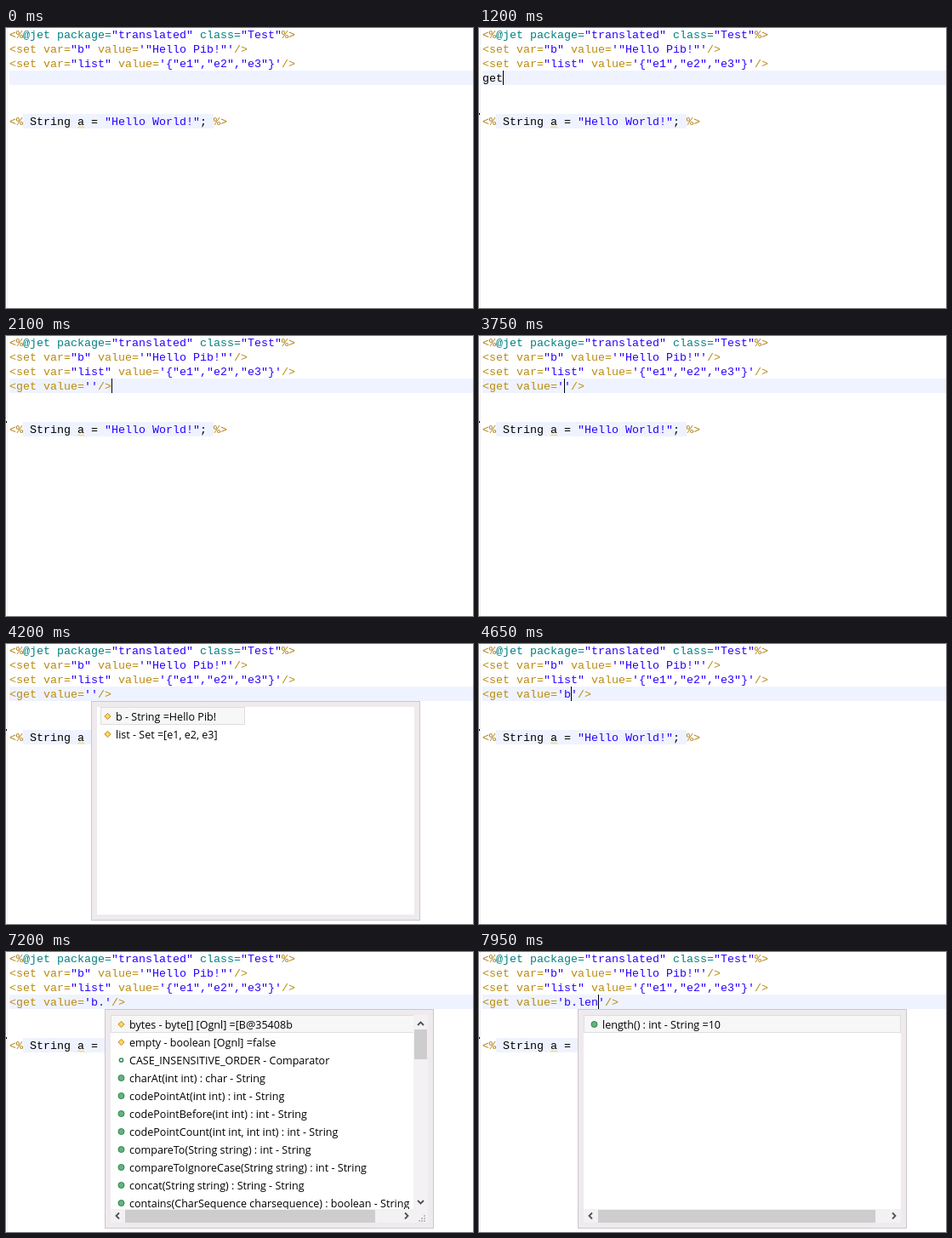
Recreate the animation shown at these times as an HTML page. Size 549x329 px, loop 8000 ms.

```html
<!DOCTYPE html>
<html lang="en">
<head>
<meta charset="utf-8">
<title>Template editor completion</title>
<style>
html, body { margin: 0; width: 100%; height: 100%; overflow: hidden; background: #fff; }
svg { display: block; }
text { white-space: pre; }
.code { font: 13.333px "Liberation Mono", "Courier New", monospace; }
.item { font: 12.55px "Open Sans", "Noto Sans", sans-serif; }
</style>
</head>
<body>
<svg id="stage" width="549" height="329" viewBox="0 0 549 329"></svg>
<script>
const LOOP = 8000;
const stage = document.getElementById('stage');
const C = { mark: '#b07d10', tag: '#bb8b10', attr: '#008080', str: '#2a00ff', plain: '#000', line: '#eff3ff', track: '#f3f1f3' };

const esc = s => s.replace(/&/g, '&amp;').replace(/</g, '&lt;').replace(/>/g, '&gt;');
const rect = (x, y, w, h, fill, extra = '') =>
  `<rect x="${x}" y="${y}" width="${w}" height="${h}" fill="${fill}" ${extra}/>`;
const path = (d, stroke, width = 1, fill = 'none') =>
  `<path d="${d}" stroke="${stroke}" stroke-width="${width}" fill="${fill}"/>`;
const outlined = (x, y, w, h, fill, stroke) =>
  rect(x + .5, y + .5, w - 1, h - 1, fill, `stroke="${stroke}"`);

// Each part is [colour, text]; columns are 8px wide.
function codeLine(row, parts) {
  let col = 0;
  return parts.map(([color, s]) => {
    const out = `<text class="code" x="${4 + 8 * col}" y="${12 + 17 * row}" fill="${C[color]}">${esc(s)}</text>`;
    col += s.length;
    return out;
  }).join('');
}

// Splits a tag into quoted values and the rest.
const tagParts = s => s.split(/('[^']*'|"[^"]*")/).filter(Boolean)
  .map(p => [/^['"]/.test(p) ? 'str' : 'tag', p]);

const fixedCode =
  rect(1, 0, 1, 329, '#f0f0f0') +
  rect(4, 50, 545, 17, C.line) + rect(20, 101, 224, 17, C.line) +
  codeLine(0, [['mark', '<%'], ['attr', '@jet package='], ['str', '"translated"'],
    ['attr', ' class='], ['str', '"Test"'], ['mark', '%>']]) +
  codeLine(1, tagParts(`<set var="b" value='"Hello Pib!"'/>`)) +
  codeLine(2, tagParts(`<set var="list" value='{"e1","e2","e3"}'/>`)) +
  codeLine(6, [['mark', '<%'], ['plain', ' String a = '], ['str', '"Hello World!"'],
    ['plain', '; '], ['mark', '%>']]) +
  path('M84 117.5l2 -2 2 2 2 -2 2 2', '#f0c840');

const chevrons = (x, y, s, width = 1.2) =>
  path(`M${x - 2} ${y - s}l${-s} ${s} ${s} ${s}M${x + 2} ${y - s}l${s} ${s} ${-s} ${s}`, '#2878b0', width);
const page = (x, y) =>
  path(`M${x - 5.5} ${y - 6.5}h8l3.5 3.5v9.5h-11.5z`, '#a88848', 1, '#fffdf0') + chevrons(x, y + .5, 3, 1.4);
const dot = (y, r, fill, stroke, width = 1) =>
  `<circle cx="12.5" cy="${y}" r="${r}" fill="${fill}" stroke="${stroke}" stroke-width="${width}"/>`;

const icons = {
  tag: y => chevrons(11.5, y, 4),
  page: y => page(12, y),
  imports: y => path(`M9.5 ${y - 3.5}h7l3 3v6h-10z`, '#a88848', 1, '#ffe9a0') + chevrons(14, y + 1.5, 2) +
    path(`M5 ${y - 5.5}h8M5 ${y - 2.5}h8M7.5 ${y - 8}v8M10.5 ${y - 8}v8`, '#8a3a90', 1.5),
  field: y => path(`M12.5 ${y - 3.6}l3.6 3.6 -3.6 3.6 -3.6 -3.6z`, '#c08a20', 1, '#ffd75e'),
  constant: y => dot(y, 2.1, '#fff', '#2e8b57', 1.5),
  method: y => dot(y, 3.5, '#62b57c', '#2e8050')
};
const items = (icon, ...labels) => labels.map(label => ({ icon, label }));

const lists = {
  tags: [
    ...items('tag', 'get', 'getf'),
    ...items('page', '<% %>', '<%! %>', '<%=%>', '<%----%>'),
    ...items('imports', '<%@jet imports=""%>'),
    ...items('tag', 'task:template', 'task:name', 'task:mode', 'task:group', 'task:ext')
  ],
  vars: items('field', 'b - String =Hello Pib!', 'list - Set =[e1, e2, e3]'),
  members: [
    ...items('field', 'bytes - byte[] [Ognl] =[B@35408b', 'empty - boolean [Ognl] =false'),
    ...items('constant', 'CASE_INSENSITIVE_ORDER - Comparator'),
    ...items('method', 'charAt(int int) : char - String', 'codePointAt(int int) : int - String',
      'codePointBefore(int int) : int - String', 'codePointCount(int int, int int) : int - String',
      'compareTo(String string) : int - String', 'compareToIgnoreCase(String string) : int - String',
      'concat(String string) : String - String',
      'contains(CharSequence charsequence) : boolean - String')
  ],
  startL: items('method', 'lastIndexOf(int int) : int - String', 'lastIndexOf(int int, int int) : int - String',
    'lastIndexOf(String string) : int - String', 'lastIndexOf(String string, int int) : int - String',
    'length() : int - String =10'),
  startLen: items('method', 'length() : int - String =10')
};

const arrow = (x, y, dx, dy) =>
  path(dy ? `M${x - 3.5} ${y - 2 * dy}l3.5 ${3.5 * dy} 3.5 ${-3.5 * dy}`
          : `M${x - 2 * dx} ${y - 3.5}l${3.5 * dx} 3.5 ${-3.5 * dx} 3.5`, '#505050', 1.8);
const vBar = (height, thumb) =>
  rect(356, 0, 17, height, C.track) + rect(357, 17, 15, thumb, '#cdcdcd') +
  arrow(364.5, 10, 0, -1) + arrow(364.5, height - 8, 0, 1);
const hBar = (width, thumb) =>
  rect(0, 228, width, 16, C.track) + rect(17, 229, thumb, 15, '#cdcdcd') +
  arrow(8, 236, -1, 0) + arrow(width - 8, 236, 1, 0);

const corner = rect(356, 228, 17, 16, C.track);
function grip() {
  let out = '';
  for (let i = 0; i < 3; i++)
    for (let j = 0; j <= i; j++) out += rect(368 - 3 * j, 235 + 3 * i, 2, 2, '#bfbfbf');
  return out;
}

function popup(x, { list, selection, bars }) {
  const rows = lists[list].map(({ icon, label }, i) => {
    const y = 11 + 21 * i;
    return icons[icon](y) + `<text class="item" x="22" y="${y + 5}">${esc(label)}</text>`;
  }).join('');
  return `<g transform="translate(${x} 67)">` +
    outlined(0, 0, 387, 258, '#eeeaee', '#cbc7cb') +
    `<svg x="7" y="7" width="373" height="244">` + rect(0, 0, 373, 244, '#fff') +
    outlined(selection[0], 0, selection[1], 21, '#f7f7f7', '#dedede') +
    rows + bars + `</svg></g>`;
}

const wide = hBar(373, 326);
const scrolling = vBar(228, 35) + hBar(356, 294) + corner;
const popups = {
  tags: { list: 'tags', selection: [4, 154], bars: vBar(244, 145) },
  vars: { list: 'vars', selection: [4, 170], bars: '' },
  members: { list: 'members', selection: [0, 357], bars: scrolling + grip() },
  typing: { list: 'members', selection: [0, 357], bars: scrolling },
  startL: { list: 'startL', selection: [0, 373], bars: wide },
  startLen: { list: 'startLen', selection: [0, 373], bars: wide }
};

// [start ms, edited line, caret column or null, popup name, popup column]
const get = v => `<get value='${v}'/>`;
const steps = [
  [0, '', null],
  [600, '', 0],
  [1050, 'ge', 2],
  [1200, 'get', 3],
  [1650, 'get', null, 'tags', 3],
  [2100, get(''), 15],
  [2550, get(''), null],
  [3450, get(''), 14],
  [3600, get(''), 13],
  [3750, get(''), 12],
  [4200, get(''), null, 'vars', 12],
  [4650, get('b'), 13],
  [5100, get('b'), null],
  [5700, get('b'), 13],
  [6300, get('b'), null],
  [6600, get('b.'), 14],
  [7200, get('b.'), null, 'members', 14],
  [7650, get('b.l'), 15, 'typing', 14],
  [7800, get('b.le'), 16, 'startL', 14],
  [7950, get('b.len'), 17, 'startLen', 14]
];

function render([start, line, caret, name, column]) {
  const parts = line.startsWith('<') ? tagParts(line) : [['plain', line]];
  stage.innerHTML = fixedCode + codeLine(3, parts) +
    (start >= 1050 ? rect(0, 100, 1, 2, '#000') : '') +
    (caret === null ? '' : rect(4 + 8 * caret, 50, 1, 17, '#000')) +
    (name ? popup(4 + 8 * column, popups[name]) : '');
}

let shown = null;
function update(now) {
  const t = now % LOOP;
  const step = steps.filter(s => s[0] <= t).pop();
  if (step !== shown) render(shown = step);
}

const origin = performance.now();
function tick() {
  update(performance.now() - origin);
  requestAnimationFrame(tick);
}
tick();
</script>
</body>
</html>
```
